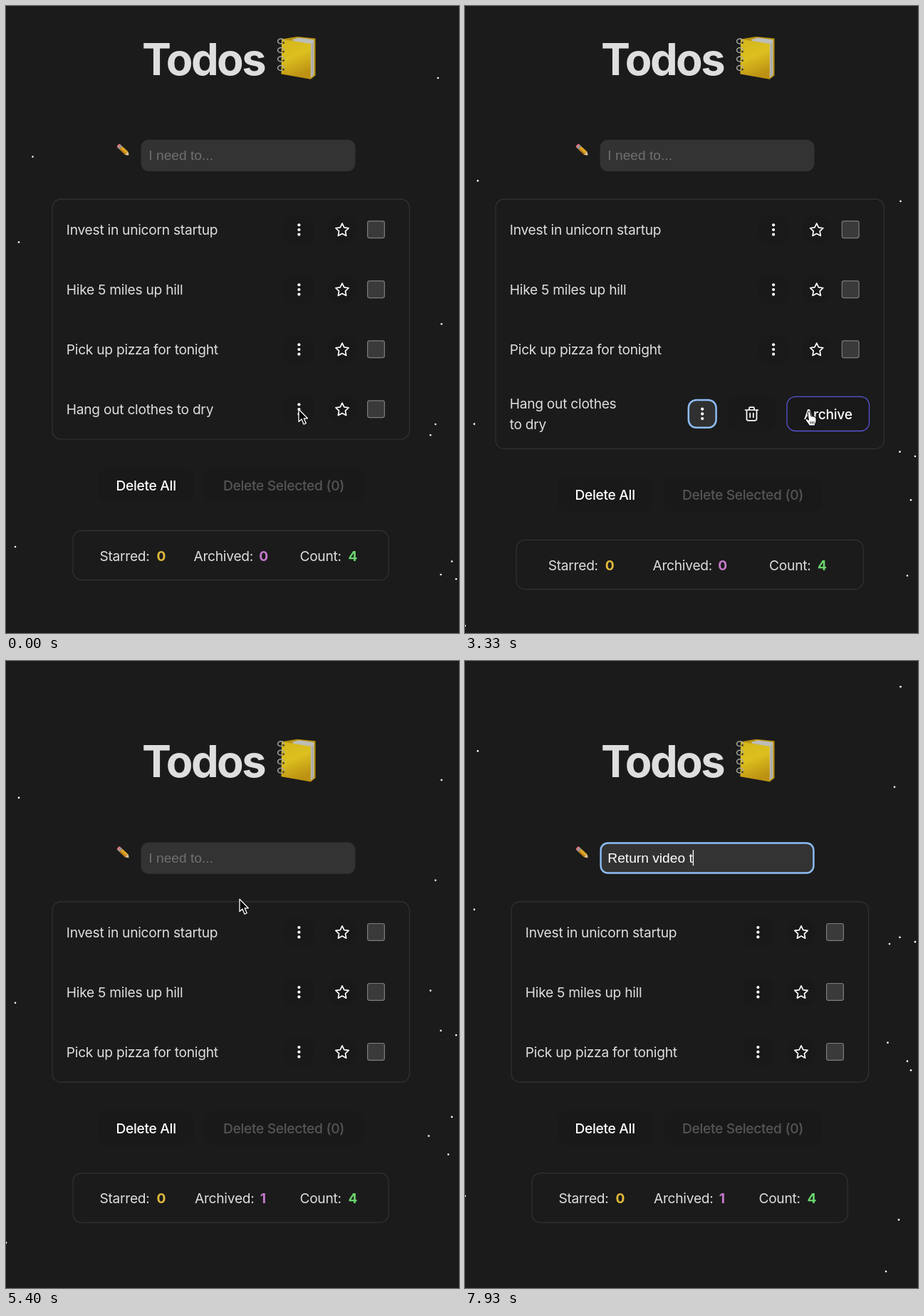
Recreate the animation shown at these times as an HTML page. Size 636x880 px, loop 8000 ms.

```html
<!DOCTYPE html>
<html lang="en">
<head>
<meta charset="utf-8">
<title>Todos</title>
<style>
  html, body { margin: 0; width: 100%; height: 100%; overflow: hidden; background: #1b1b1b; }
  svg { display: block; width: 100vw; height: 100vh; }
  text { font: 400 19.2px Inter, sans-serif; font-optical-sizing: none; letter-spacing: -.27px; fill: #dedede; white-space: pre; }
  .title { font-size: 61.44px; font-weight: 700; letter-spacing: -2.5px; }
  .btn { font-weight: 500; letter-spacing: -.3px; fill: #fff; text-anchor: middle; }
  .off { fill: #555; }
  .num { font-weight: 700; }
  .field { font-family: "Liberation Sans", Arial, sans-serif; letter-spacing: 0; fill: #fff; }
  .hint { fill: #6f6f6f; }
</style>
</head>
<body>
<svg id="stage" viewBox="0 0 636 880" preserveAspectRatio="none">
  <defs>
    <linearGradient id="cover" x1="0" y1="0" x2=".3" y2="1">
      <stop offset="0" stop-color="#d3b51c"/><stop offset=".5" stop-color="#dcc01f"/><stop offset="1" stop-color="#bd9213"/>
    </linearGradient>
  </defs>
  <g id="scene"></g>
</svg>
<script>
const LOOP = 8000, STEP = 1000 / 15;
const OPEN = 1265, ARCHIVE = 3795, FOCUS = 5795, TYPE = 6530, KEY = 100;
const FAST = 51.7, SLOW = 25.85;
const MESSAGE = 'Return video t';
const TODOS = ['Invest in unicorn startup', 'Hike 5 miles up hill', 'Pick up pizza for tonight', 'Hang out clothes to dry'];

// x, y at time zero, speed in px/s
const STARS = [
  [606.5, 101, FAST], [37.5, 211.5, FAST], [611.5, 446.3, FAST], [603, 587, FAST], [13, 759, FAST],
  [610.5, 798, FAST], [632, 804.3, FAST], [621, 971.8, FAST], [593.5, 945.8, FAST], [609, 1194.3, FAST],
  [591, 1267, FAST], [18, 331.5, SLOW], [596, 602.2, SLOW], [626, 779.5, SLOW], [0, 956, SLOW]
];

// time, x, y of the pointer
const PATH = [
  [0, 411, 566], [300, 410, 568], [1350, 410, 568], [1900, 387, 581], [2350, 387, 581],
  [2950, 483, 570], [4850, 483, 570], [5600, 295, 284], [LOOP, 295, 284]
];

const scene = document.getElementById('scene');
const clamp = v => Math.max(0, Math.min(1, v));
const smooth = v => v * v * (3 - 2 * v);
const hover = (t, on, off) => clamp((t - on) / 250) * (1 - clamp((t - off) / 250));

const text = (x, y, s, cls = '', extra = '') => `<text x="${x}" y="${y}" class="${cls}" ${extra}>${s}</text>`;
const rect = (x, y, w, h, r, attrs) => `<rect x="${x}" y="${y}" width="${w}" height="${h}" rx="${r}" ${attrs}/>`;
const path = (d, attrs) => `<path d="${d}" ${attrs}/>`;
const move = (x, y, s) => `<g transform="translate(${x} ${y})">${s}</g>`;
const frame = (x, y, w, h) => rect(x, y, w, h, 12, 'fill="none" stroke="#333" stroke-width="1.2"');

function button(x, y, w, h, glow = 0) {
  return rect(x, y, w, h, 12, 'fill="#191919"') +
    (glow ? rect(x, y, w, h, 12, `fill="none" stroke="#5654d8" stroke-width="1.3" opacity="${glow}"`) : '');
}

const dots = (x, y) => [-6.7, 0, 6.7].map(d => `<circle cx="${x}" cy="${y + d}" r="2.1" fill="#fff"/>`).join('');

function kebab(x, y, glow, focused) {
  const ring = focused ? rect(x - 19.4, y - 19.4, 38.8, 38.8, 11, 'fill="#303030" stroke="#8dbdf6" stroke-width="2.5"') : '';
  return button(x - 20.3, y - 20.3, 40.6, 40.6, glow) + ring + dots(x, y);
}

function starIcon(x, y) {
  const pts = Array.from({ length: 10 }, (_, i) => {
    const a = (i / 5 - .5) * Math.PI, r = i % 2 ? 4.7 : 9.6;
    return (x + r * Math.cos(a)).toFixed(2) + ',' + (y + .7 + r * Math.sin(a)).toFixed(2);
  }).join(' ');
  return `<circle cx="${x}" cy="${y}" r="20" fill="#191919"/>` +
    `<polygon points="${pts}" fill="none" stroke="#fff" stroke-width="1.7" stroke-linejoin="round"/>`;
}

const trash = (x, y, color) => move(x, y, path(
  'M-9-5.5H9M-3.5-5.5V-8Q-3.5-9.3-2.2-9.3H2.2Q3.5-9.3 3.5-8V-5.5M-7-5.5V7Q-7 9.3-4.7 9.3H4.7Q7 9.3 7 7V-5.5M-2.3-1V4.8M2.3-1V4.8',
  `fill="none" stroke="${color}" stroke-width="1.7" stroke-linecap="round" stroke-linejoin="round"`));

const notebook =
  path('M387 46.5L409 43L434.5 45.5V97.5L427.5 103Z', 'fill="#b8920f"') +
  path('M402 47L411 44.6L432.3 47.2V97L427.5 101Z', 'fill="#bdbdb8"') +
  path('M430 52V98', 'stroke="#8c8c88" stroke-width=".8"') +
  path('M387 46.5L427.8 53V102.7L386.5 95.5Z', 'fill="url(#cover)"') +
  [49.5, 62, 74.5, 87].map(y =>
    `<ellipse cx="386" cy="${y}" rx="4.4" ry="3.4" fill="none" stroke="#a9a9a2" stroke-width="1.5"/>` +
    `<circle cx="389.5" cy="${y + 2}" r="1.5" fill="#5a4810"/>`).join('');

const pencil = `<g transform="translate(165 202.5) rotate(43) scale(.9)">` +
  rect(-12, -3.3, 5, 6.6, 2, 'fill="#d9797f"') +
  rect(-8.5, -3.3, 3, 6.6, 0, 'fill="#8e9a9c"') +
  rect(-5.5, -3.3, 12, 6.6, 0, 'fill="#e0a526"') +
  rect(-5.5, 1, 12, 2.3, 0, 'fill="#b97a18"') +
  path('M6.5-3.3L12.5 0L6.5 3.3Z', 'fill="#e3c49a"') +
  path('M10.3-1.2L12.5 0L10.3 1.2Z', 'fill="#222"') + '</g>';

const POINTERS = {
  arrow: path('M0 0V17.4L4 13.8L7 21L10.2 19.6L7.2 12.8H12.4Z', 'fill="#000" stroke="#fff" stroke-width="1.3" stroke-linejoin="round"'),
  hand: path('M-1.6 0Q0-2.6 1.6 0L3.2 6Q4.4 4.6 5.6 6.2Q7 5.2 8 7Q9.6 6.4 10 8.4V13Q9.6 15 8.4 17V19H.2Q-.6 16.6-3 14L-5 11Q-5.2 8.8-2.6 9.8L-.6 11.2L-1.9 2Z',
    'fill="#fff" stroke="#000" stroke-width="1" stroke-linejoin="round"') +
    path('M2 13V16.5M4.4 13V16.5M6.8 13V16.5', 'stroke="#000" stroke-width=".9"'),
  beam: ['#fff" stroke-width="3.2', '#000" stroke-width="1.2'].map(s =>
    path('M-4-9.5Q0-9.5 0-7Q0-9.5 4-9.5M0-7V7M-4 9.5Q0 9.5 0 7Q0 9.5 4 9.5M-2.5 3H2.5', `fill="none" stroke="${s}"`)).join('')
};

function pointerAt(t) {
  const i = PATH.findIndex((p, k) => t < PATH[k + 1][0]);
  const [t0, x0, y0] = PATH[i], [t1, x1, y1] = PATH[i + 1];
  const k = smooth((t - t0) / (t1 - t0));
  return [x0 + (x1 - x0) * k, y0 + (y1 - y0) * k];
}

// The page column is opaque, so stars inside it stay hidden.
function stars(t, left, right) {
  return STARS.map(([x, y, v]) => {
    const cy = y - v * t / 1000;
    const hidden = (x > left && x < right) || cy < -2 || cy > 882;
    return hidden ? '' : `<circle cx="${x}" cy="${cy.toFixed(2)}" r="1.3" fill="#fff"/>`;
  }).join('');
}

function header(t) {
  const focused = t >= FOCUS;
  const typed = MESSAGE.slice(0, Math.max(0, Math.floor((t - TYPE) / KEY + .05)));
  const caretOn = focused && (typed || (t - FOCUS) % 1000 < 500);
  return text(191, 96.5, 'Todos', 'title') + notebook + pencil +
    rect(189.5, 187.8, 301, 44.2, 11, 'fill="#333"') +
    (focused ? rect(190.6, 188.8, 298.8, 42, 10, 'fill="none" stroke="#8dbdf6" stroke-width="2.4"') : '') +
    (typed ? text(200.3, 216, typed, 'field', 'id="typed"') : text(200.3, 216, 'I need to...', 'field hint')) +
    (caretOn ? rect(200.3, 198.5, 1.3, 22, 0, 'id="caret" fill="#fff"') : '');
}

function list(t, open, done, left, width) {
  const right = left + width;
  let out = frame(left, 271.2, width, open ? 350.2 : done ? 253.2 : 336.8);
  TODOS.slice(0, done ? 3 : 4).forEach((name, i) => {
    const y = 314 + 84 * i;
    if (open && i === 3) {
      const overTrash = hover(t, OPEN, 2500), overArchive = hover(t, 2680, LOOP);
      out += text(62.7, 565, 'Hang out clothes') + text(62.7, 594, 'to dry') +
        kebab(333.2, 572.4, 0, true) +
        button(368.8, 548.3, 67.8, 48.2, overTrash) + trash(402.5, 572.5, overTrash > .3 ? '#e0605e' : '#fff') +
        button(452, 548.3, 115.5, 48.2, overArchive) + text(509.7, 579.5, 'Archive', 'btn');
      return;
    }
    out += text(left + 19.8, y + 7, name) +
      kebab(right - 155.1, y, i === 3 ? hover(t, 130, LOOP) : 0) +
      starIcon(right - 94.5, y) +
      rect(right - 58.9, y - 12.2, 23.8, 23.8, 2.8, 'fill="#3a3a3a" stroke="#7c7c7c" stroke-width="1.2"');
  });
  return out;
}

function footer(open, done) {
  const spread = open ? 14.7 : 0, edge = open ? 72 : 94;
  const stat = (x, label, nx, n, color) => text(x, 778.5, label) + text(nx, 778.5, n, 'num', `style="fill:${color}"`);
  return button(130, 648.8, 133.5, 48.2) + text(196.6, 680, 'Delete All', 'btn') +
    button(278.5, 648.8, 223, 48.2) + text(390, 680, 'Delete Selected (0)', 'btn off') +
    frame(edge, 736.4, 631.2 - 2 * edge, 69.2) +
    stat(131.4 - spread, 'Starred:', 211.4 - spread, 0, '#e2ba3c') +
    stat(done ? 265 : 263.5, 'Archived:', done ? 356.8 : 355.2, done ? 1 : 0, '#c47acb') +
    stat(412.4 + spread, 'Count:', 480.4 + spread, 4, '#6ad46c');
}

function pointer(t) {
  if (t >= TYPE + KEY) return '';
  const [x, y] = pointerAt(t);
  const kind = t < 130 ? 'arrow' : t < ARCHIVE ? 'hand' : y < 298 ? 'beam' : 'arrow';
  return move(x, y, POINTERS[kind]);
}

function draw(t) {
  const open = t >= OPEN && t < ARCHIVE, done = t >= ARCHIVE;
  const left = open ? 43 : 65, width = open ? 545.2 : 501.5;
  const shift = done ? 66.7 : 0;
  scene.innerHTML = stars(t, left - 21.4, left + width + 21.4) +
    move(0, shift, header(t) + list(t, open, done, left, width)) +
    move(0, open ? 13 : done ? -17.5 : 0, footer(open, done)) +
    pointer(t);
  const typed = document.getElementById('typed'), caret = document.getElementById('caret');
  if (typed && caret) caret.setAttribute('x', 200.3 + typed.getComputedTextLength());
}

let last = -1;
const start = performance.now();
function tick() {
  const step = Math.floor(((performance.now() - start) % LOOP + 4) / STEP) % 120;
  if (step !== last) draw((last = step) * STEP);
  requestAnimationFrame(tick);
}
tick();
</script>
</body>
</html>
```
